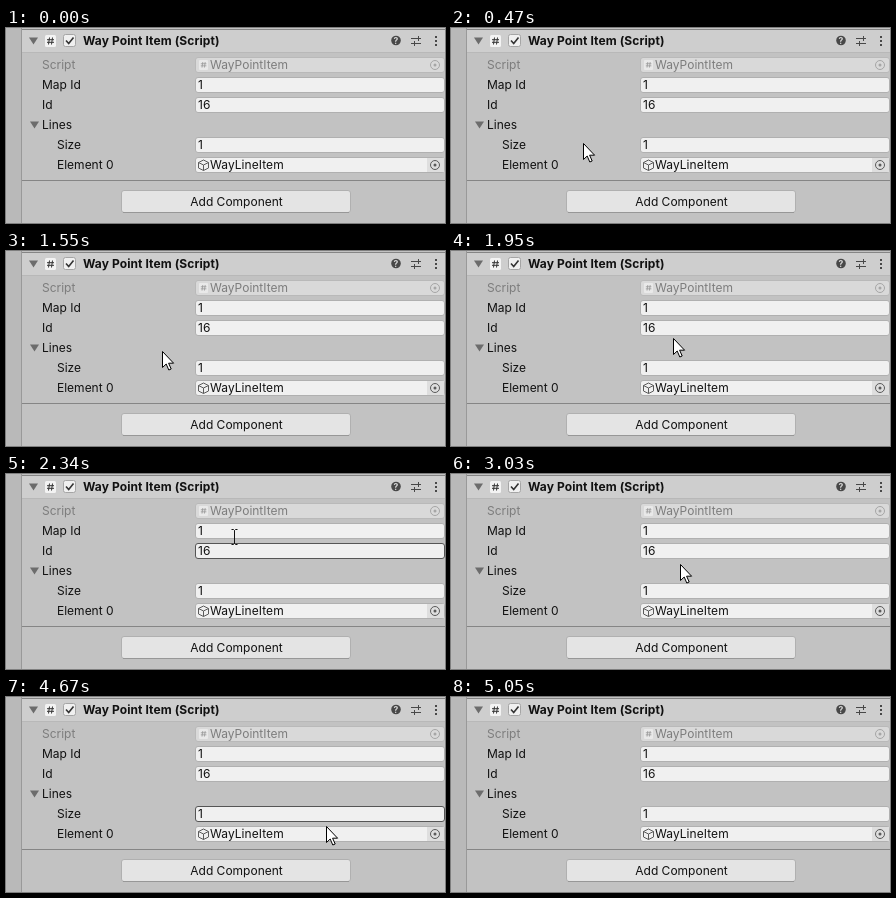
Write an HTML page that moves like this. It is 439 by 195 pixels and loops after 7.3 s.

```html
<!DOCTYPE html>
<html lang="en">
<head>
<meta charset="utf-8">
<title>Inspector</title>
<style>
  html, body { margin: 0; width: 100%; height: 100%; overflow: hidden; background: #c2c2c2; }
  svg { display: block; width: 439px; height: 195px; color: #5a5a5a; }
  text { font: 12px Inter, sans-serif; fill: #111; }
  .title { font-weight: 700; letter-spacing: .09px; }
  .dim { color: #a6a6a6; }
  .dim text { fill: #7d7d7d; }
  .field { fill: #f0f0f0; stroke: #b0b0b0; width: 249px; height: 15px; rx: 2.5px; }
  .field.hover { stroke: #555; }
  .dim .field { fill: #d9d9d9; stroke: #b9b9b9; }
  .icon { fill: none; stroke: currentColor; }
</style>
</head>
<body>
<svg viewBox="0 0 439 195">
  <defs>
    <path id="fold" d="M0 0h9l-4.5 7z" fill="#6c6c6c"/>
    <g id="picker"><circle class="icon" r="4.5"/><circle r="1.5" fill="currentColor"/></g>
    <path id="hash" d="M2.5 0L1.5 7M5.5 0L4.5 7M0 2.2h7M0 4.8h7" fill="none"/>
  </defs>

  <rect width="439" height="195" fill="#c2c2c2"/>
  <rect x="16" y="2" width="423" height="22" fill="#cecece"/>
  <rect width="16" height="195" fill="#b9b9b9"/>
  <path d="M15.5 0v195" stroke="#999"/>
  <path d="M16 1.5h423M16 152.5h423" stroke="#858585"/>
  <path d="M16 24.5h423" stroke="#b8b8b8"/>

  <use href="#fold" x="23" y="9.5"/>
  <rect x="39" y="7" width="11" height="12" rx="1.5" fill="#f3f3f3"/>
  <use href="#hash" x="41" y="9.5" stroke="#333"/>
  <rect x="57.5" y="6.5" width="12" height="12" rx="2" fill="#f0f0f0" stroke="#a5a5a5"/>
  <path d="M60 12.5l2.7 3 4.8-6" fill="none" stroke="#333" stroke-width="1.6"/>
  <text class="title" x="77" y="17">Way Point Item (Script)</text>
  <circle cx="390" cy="12.5" r="4.8" fill="#484848"/>
  <text x="390" y="15.7" text-anchor="middle" style="font-size:8.5px;font-weight:700;fill:#ddd">?</text>
  <path d="M405 10.5h10M405 15.5h10M412.5 8v5M408.5 13v5" stroke="#484848"/>
  <path d="M429 8h2v2h-2zM429 12h2v2h-2zM429 16h2v2h-2z" fill="#484848"/>

  <g class="dim">
    <text x="36" y="41">Script</text>
    <rect class="field" x="189.5" y="29.5"/>
    <rect x="193" y="32" width="9" height="10" rx="1" fill="#e9e9e9"/>
    <use href="#hash" transform="translate(194.8 34) scale(.8)" stroke="#999"/>
    <text x="204" y="41">WayPointItem</text>
    <use href="#picker" x="429" y="37"/>
  </g>

  <rect class="field" x="189.5" y="49.5"/>
  <rect class="field" x="189.5" y="69.5"/>
  <rect class="field" x="189.5" y="109.5"/>
  <rect class="field" x="189.5" y="129.5"/>
  <text x="36" y="61">Map Id</text><text x="192" y="61">1</text>
  <text x="36" y="81">Id</text><text x="192" y="81">16</text>
  <use href="#fold" x="24" y="93.5"/>
  <text x="36" y="101">Lines</text>
  <text x="51" y="121">Size</text><text x="192" y="121">1</text>
  <text x="51" y="141">Element 0</text>
  <path class="icon" d="M197.5 132l5 2.5v5.5l-5 2.5-5-2.5v-5.5zM192.5 134.5l5 2.5 5-2.5M197.5 137v5.5"/>
  <text x="204" y="141" letter-spacing=".06">WayLineItem</text>
  <rect x="421" y="130" width="17" height="14" fill="#dedede"/>
  <use href="#picker" x="429" y="137"/>

  <rect x="115.5" y="162.5" width="229" height="22" rx="2.5" fill="#e4e4e4" stroke="#b0b0b0"/>
  <path d="M117 184.5h226" stroke="#979797"/>
  <text x="230.5" y="178" text-anchor="middle">Add Component</text>

  <path id="arrow" d="M.5.5V16.5L4.2 13l2.6 6 2.4-1-2.6-5.8h5z" fill="#fff" stroke="#000"/>
  <path id="beam" d="M-2.5-7.5h2l1 1 1-1h2M.5-6.5v13M-2.5 7.5h2l1-1 1 1h2" fill="none" stroke="#111"/>
</svg>
<script>
const LOOP = 7300;
const TICK = 77;
const outside = [440, 200];

// Each move goes on from the last one: first and last step in ms, bend, destination.
const moves = [
  { from: 70, until: 780, bend: [200, 115], to: [64, 107] },
  { from: 840, until: 1160, bend: [51, 101], to: [42, 104] },
  { from: 1390, until: 2100, bend: [203, 103], to: [226, 84] },
  { from: 2180, until: 2410, bend: [228, 76], to: [228, 59] },
  { from: 2800, until: 3340, bend: [238, 66], to: [220, 121] },
  { from: 3740, until: 3880, bend: [232, 121], to: [245, 122] },
  { from: 4200, until: 4270, bend: [259, 123], to: [273, 124] },
  { from: 4670, until: 5050, bend: [370, 125], to: outside }
];

const fields = [...document.querySelectorAll('.field')].slice(1);
const arrow = document.getElementById('arrow');
const beam = document.getElementById('beam');
const tops = fields.map(field => Math.floor(field.getAttribute('y')));
const fieldAt = ([x, y]) => x < 189 || x > 438 ? -1 : tops.findIndex(top => y >= top && y < top + 16);
const easeOut = t => 1 - (1 - t) ** 1.6;
const curve = (a, b, c, u) =>
  a.map((_, k) => Math.round((1 - u) ** 2 * a[k] + 2 * u * (1 - u) * b[k] + u * u * c[k]));

const steps = [{ time: 0, point: outside, over: -1, hover: -1 }];
let origin = outside;
for (const { from, until, bend, to } of moves) {
  const gaps = Math.round((until - from) / TICK);
  for (let i = 0; i <= gaps; i++) {
    const point = curve(origin, bend, to, easeOut((i + 1) / (gaps + 1)));
    const over = fieldAt(point);
    // Between fields, the highlight follows the pointer one step late.
    const hover = over < 0 ? -1 : steps[steps.length - 1].over;
    const time = Math.floor((from + (until - from) * i / gaps) / 10) * 10;
    steps.push({ time, point, over, hover });
  }
  origin = to;
}

function draw() {
  const time = performance.now() % LOOP;
  const { point, over, hover } = steps.findLast(step => step.time <= time);
  const isText = over >= 0 && over < 3;
  beam.style.visibility = isText ? 'visible' : 'hidden';
  arrow.style.visibility = isText ? 'hidden' : 'visible';
  (isText ? beam : arrow).setAttribute('transform', `translate(${point})`);
  fields.forEach((field, i) => field.classList.toggle('hover', i === hover));
  requestAnimationFrame(draw);
}
draw();
</script>
</body>
</html>
```
